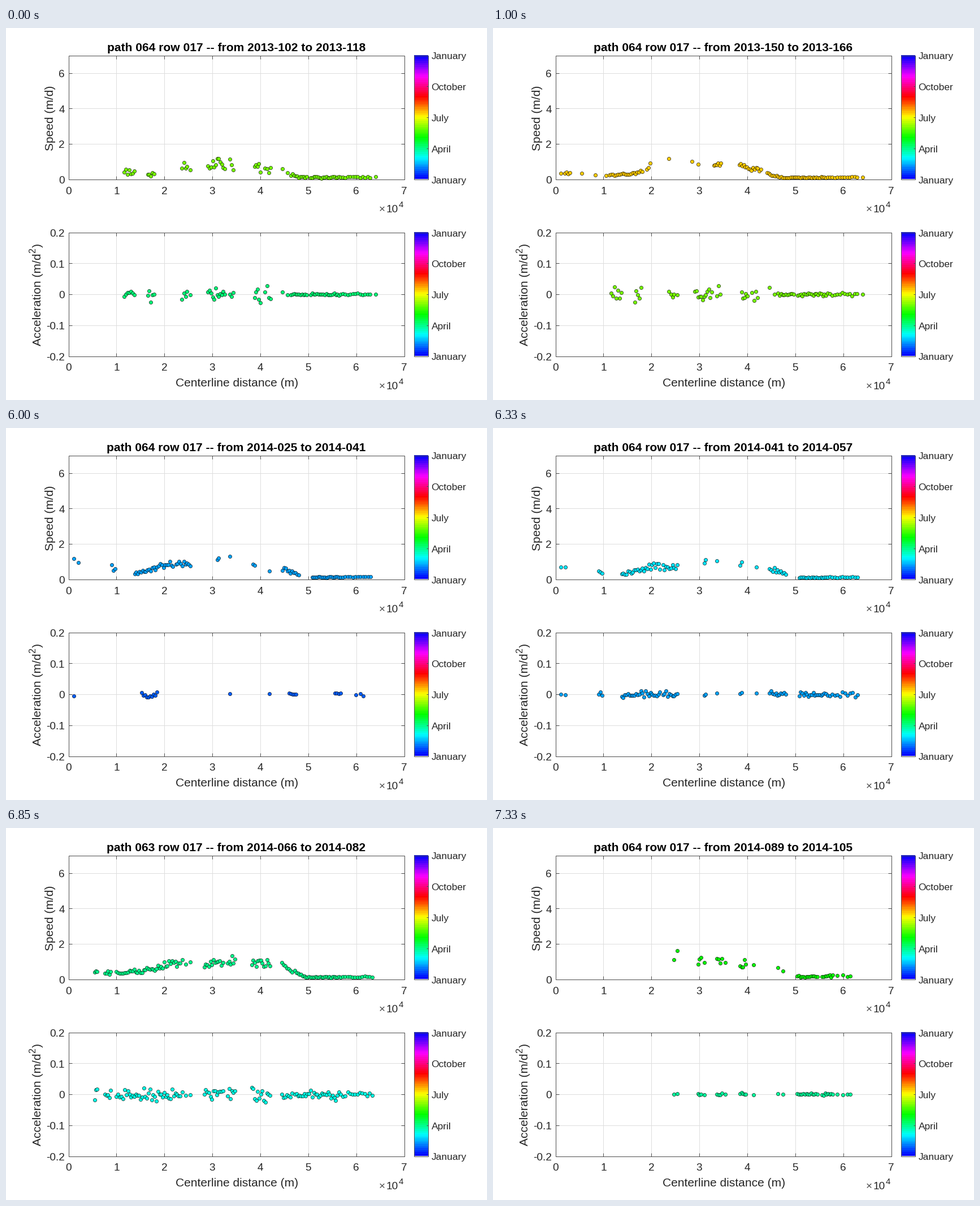
Recreate the animation shown at these times as a matplotlib script. Size 851 by 658 pixels, loop 8 s.

```python
import colorsys
import numpy as np
import matplotlib.pyplot as plt
from matplotlib.animation import FuncAnimation

W, H, DPI = 851, 658, 64
LOOP, INTERVAL = 8000, 40
PX = 72 / DPI                      # points per pixel
INK = (0.15, 0.15, 0.15)
AXIS = (0.3, 0.3, 0.3)
GRID = (0.87, 0.87, 0.87)
LEFT, RIGHT = 110.5, 704.5
SPEED_BOX = (48.5, 267.5, 0, 7)    # top, bottom, lowest and highest value
ACCEL_BOX = (361.5, 580.5, -0.2, 0.2)

plt.rcParams["font.family"] = "Liberation Sans"
fig = plt.figure(figsize=(W / DPI, H / DPI), dpi=DPI, facecolor="white")
ax = fig.add_axes([0, 0, 1, 1])


# ---- data: distances in km, speeds in m/d, accelerations in m/d^2

# Distances at which every speed profile is given.
KNOTS = (0, 8, 12, 17, 20, 24, 30, 34, 39, 42, 45, 48, 50, 64)

SPRING = (.3, .3, .4, .27, .4, .75, .85, .8, .65, .6, .42, .12, .1, .12)
JUNE = (.4, .27, .25, .33, .85, 1.1, .8, .8, .76, .55, .25, .08, .1, .12)
JULY = (0, 0, 0, .4, .5, .6, .8, .7, .46, .46, .25, .08, .12, .08)
JANUARY = (1, .8, .25, .48, .82, .85, .85, 1.55, .8, .54, .55, .25, .1, .15)
FEBRUARY = (.2, .27, .25, .42, .7, .55, .8, .9, .87, .8, .63, .3, .07, .09)
APRIL = (.5, .5, .5, .7, 1, 1.3, .95, 1.25, .88, 1, .9, .3, .16, .2)

# Stretches of the centerline with measurements; single values are lone points.
SPRING_RUNS = ((11.6, 13.7), (16.5, 17.8), (23.6,), (24.1, 24.7), (25.4,), (29.1, 32.6),
               (33.7, 34.4), (38.8, 40), (41, 42.1), (44.6,), (45.7,),
               (46.4, 49.7), (50.5, 56.4), (56.7, 62.9), (64.1,))
JUNE_RUNS = ((1.1,), (2, 3), (5.5,), (8.3,), (10.5,), (11.3, 15.4), (15.7, 18.1), (19, 19.7),
             (23.6,), (28.5,), (29.8,), (33, 34.5), (38.3, 42.8), (44.1, 56.4),
             (56.7, 62.9), (64.1,))
JULY_RUNS = ((15.5,), (16.7,), (33.6, 34.7), (38, 42.8), (44, 56.4), (56.7, 63.4))
JANUARY_RUNS = ((1.1,), (2.1,), (9, 9.7), (13.8, 21.8), (22.4, 25.4), (31, 31.3), (33.7,),
                (38.5, 38.8), (41.9,), (44.6, 48), (50.8, 56.7), (57.2, 63))
JANUARY_OVERLAP = ((1.1,), (15.3, 18.4), (33.7,), (41.9,), (46, 47.4), (55.6, 56.7),
                   (59.9,), (60.9, 61.4))
FEBRUARY_RUNS = ((5.5, 6), (7.6, 8.8), (10, 12.1), (12.4, 20.3), (20.6, 23.3), (23.8,),
                 (24.5,), (25.4,), (28.3, 32.2), (33.2, 34.7), (38.2, 42), (44.5, 46.6),
                 (47.2, 49.8), (50.2, 56.7), (57.2, 63.3))
APRIL_RUNS = ((24.7,), (25.4,), (29.7, 30.4), (31,), (33.7, 34.7), (35.4,), (38.5, 39.7),
              (41.3,), (46.4,), (47.4,), (50.4, 54.6), (55.6, 57.8), (58.8,), (59.9,),
              (60.9, 61.4))


def stations(runs):
    """Evenly spaced distances along each run, wider apart near the head."""
    parts = []
    for run in runs:
        a, b = run[0], run[-1]
        step = 0.52 if a > 56.6 else 0.33
        parts.append(np.linspace(a, b, round((b - a) / step) + 1))
    return np.concatenate(parts)


def measure(seed, profile, runs, noise, spread, accel_runs=None):
    """Speeds scattered about a profile, accelerations scattered about zero.

    spread holds the deviation of the acceleration below and above 45 km.
    """
    rng = np.random.default_rng(seed)
    x = stations(runs)
    base = np.interp(x, KNOTS, profile)
    speed = np.maximum(base * (1 + noise * rng.uniform(-1.7, 1.7, len(x))), 0.04)
    ax_km = stations(accel_runs or runs)
    accel = rng.normal(0, 1, len(ax_km)) * np.where(ax_km < 45, *spread)
    return (x, speed), (ax_km, accel)


def between(p, q):
    return np.mean([p, q], axis=0)


# start ms, path, year, day, speed hue, acceleration hue, series
SCENES = [
    (0, 64, 2013, 102, 92, 148,
     measure(1, SPRING, SPRING_RUNS, .25, (.011, .002))),
    (1000, 64, 2013, 150, 48, 92,
     measure(2, JUNE, JUNE_RUNS, .12, (.013, .003), SPRING_RUNS)),
    (2000, 64, 2013, 198, 18, 48,
     measure(3, JULY, ((31.5,),) + JULY_RUNS, .12, (.002, .0006), JULY_RUNS)),
    (6000, 64, 2014, 25, 202, 218,
     measure(4, JANUARY, JANUARY_RUNS, .13, (.006, .004), JANUARY_OVERLAP)),
    (6330, 64, 2014, 41, 186, 202,
     measure(5, between(JANUARY, FEBRUARY), JANUARY_RUNS, .15, (.006, .004))),
    (6520, 63, 2014, 50, 174, 195,
     measure(6, FEBRUARY, FEBRUARY_RUNS, .15, (.019, .01))),
    (6850, 63, 2014, 66, 153, 174,
     measure(7, between(FEBRUARY, APRIL), FEBRUARY_RUNS, .15, (.012, .006))),
    (7330, 64, 2014, 89, 118, 157,
     measure(8, APRIL, APRIL_RUNS, .2, (.002, .0015))),
]


# ---- drawing, in pixels with y pointing down

def label(x, y, s, size, ha="left", color=INK, **kw):
    return ax.text(x, y, s, fontsize=size * PX, ha=ha, va="baseline", color=color, **kw)


def line(x0, y0, x1, y1, color=AXIS, z=2):
    ax.plot([x0, x1], [y0, y1], color=color, lw=PX, zorder=z, solid_capstyle="butt")


def to_px(series, box):
    top, bottom, low, high = box
    x, y = series
    return LEFT + x / 70 * (RIGHT - LEFT), bottom - (y - low) / (high - low) * (bottom - top)


def frame(left, right, top, bottom):
    for y in (top, bottom):
        line(left, y, right, y)
    for x in (left, right):
        line(x, top, x, bottom)


def panel(box, ticks):
    top, bottom, low, high = box
    for i in range(8):
        x = LEFT + i * (RIGHT - LEFT) / 7
        line(x, top, x, bottom, GRID, 1)
        line(x, bottom, x, bottom - 6)
        line(x, top, x, top + 6)
        label(x, bottom + 26, str(i), 19, "center")
    for value in ticks:
        y = bottom - (value - low) / (high - low) * (bottom - top)
        line(LEFT, y, RIGHT, y, GRID, 1)
        line(LEFT, y, LEFT + 6, y)
        line(RIGHT, y, RIGHT - 6, y)
        label(104, y + 7.5, f"{value:g}", 19, "right")
    frame(LEFT, RIGHT, top, bottom)
    label(660, bottom + 58.5, "×", 19, color=AXIS)
    label(672.5, bottom + 58.5, "10", 19)
    label(695, bottom + 49.5, "4", 15)


def colorbar(top, bottom):
    left, right = 721.5, 746.5
    hues = [(240 - 360 * i / 63) % 360 for i in range(63, -1, -1)]
    strip = np.array([[colorsys.hsv_to_rgb(h / 360, 1, 1)] for h in hues])
    ax.imshow(strip, extent=(left, right, bottom, top), aspect="auto",
              interpolation="nearest", zorder=1)
    frame(left, right, top, bottom)
    for i, month in enumerate(["January", "April", "July", "October", "January"]):
        y = bottom - i * (bottom - top) / 4
        line(right - 3, y, right, y)
        label(752.5, y + 7, month, 17.4)


def markers():
    return ax.plot([], [], "o", ms=6.2 * PX, mec="black", mew=0.6 * PX, zorder=3)[0]


for box, ticks in ((SPEED_BOX, (0, 2, 4, 6)), (ACCEL_BOX, (-0.2, -0.1, 0, 0.1, 0.2))):
    panel(box, ticks)
    colorbar(*box[:2])

upright = dict(rotation=90, rotation_mode="anchor")
label(84.5, 217, "Speed (m/d)", 21, **upright)
label(61.5, 561.5, "Acceleration (m/d", 21, **upright)
label(52, 397.5, "2", 16, **upright)
label(61.5, 388.5, ")", 21, **upright)
label(408.5, 634, "Centerline distance (m)", 21, "center")
title = label(407.5, 41, "", 21, "center", "black", weight="bold")
speed_dots, accel_dots = markers(), markers()

ax.set_xlim(0, W)
ax.set_ylim(H, 0)
ax.axis("off")


def update(i):
    scene = [s for s in SCENES if s[0] // INTERVAL <= i][-1]
    _, path, year, day, speed_hue, accel_hue, (speed, accel) = scene
    title.set_text(f"path {path:03d} row 017 -- from {year}-{day:03d} to {year}-{day + 16:03d}")
    for dots, series, box, hue in ((speed_dots, speed, SPEED_BOX, speed_hue),
                                   (accel_dots, accel, ACCEL_BOX, accel_hue)):
        dots.set_data(*to_px(series, box))
        dots.set_markerfacecolor(colorsys.hsv_to_rgb(hue / 360, 1, 1))
    return title, speed_dots, accel_dots


anim = FuncAnimation(fig, update, frames=LOOP // INTERVAL, interval=INTERVAL,
                     repeat=True, repeat_delay=0)
plt.show()
```
